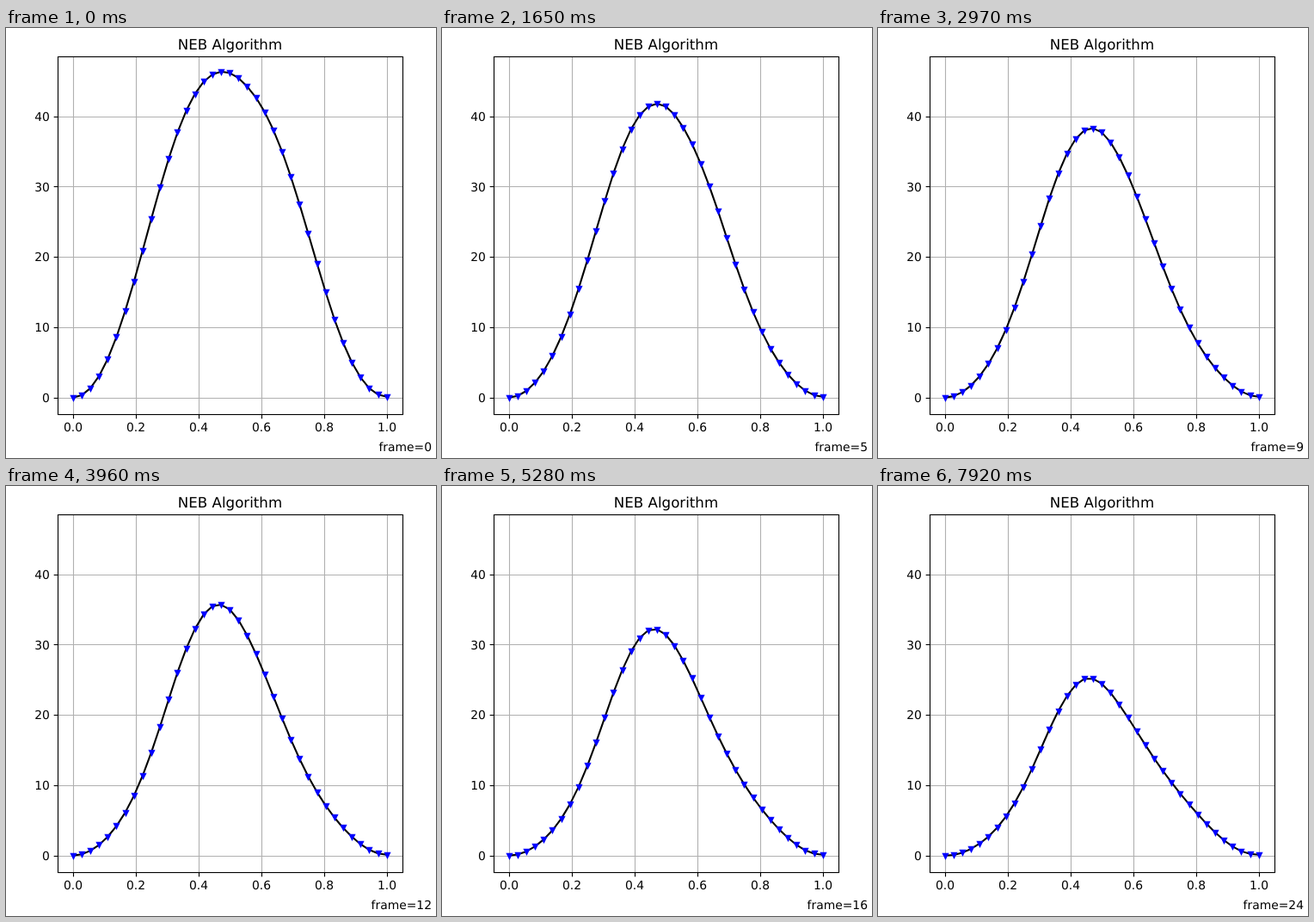
An HTML page with a canvas for the animation above (8 s loop, 500 by 500 pixels).

```html
<!DOCTYPE html>
<html lang="en">
<head>
<meta charset="utf-8">
<title>NEB Algorithm</title>
<style>
  html, body { margin: 0; width: 100%; height: 100%; overflow: hidden; background: #fff; }
  canvas { display: block; width: 500px; height: 500px; }
</style>
</head>
<body>
<canvas id="plot"></canvas>
<script>
const LOOP = 8000, STEP = 330, IMAGES = 37;
const FONT = '"DejaVu Sans", sans-serif';
const BOX = { left: 60.5, right: 461.5, top: 33.5, bottom: 449.5 };
const X0 = 77.8, WIDTH = 364.85;
const Y0 = 429.75, UNIT = 8.17;
const TICK = 4.86, THIN = 1.11;

// The barrier is sin²(πs) times a slowly varying gain in px.
// Each key gives the gain at ten evenly spaced points of the path.
const keys = [
  { iteration: 0, gain: [335, 384, 413.5, 410.6, 387, 372.4, 380.5, 376, 343, 350] },
  { iteration: 5, gain: [260, 264, 306.5, 347.6, 348.5, 323.4, 288, 240, 223.5, 257] },
  { iteration: 12, gain: [181, 187, 224.5, 283.6, 298.5, 263.4, 212, 177, 180, 195] },
  { iteration: 24, gain: [80, 119, 147.5, 195.6, 211.5, 180.4, 150, 143, 146, 115] }
];
const knots = keys[0].gain.map((_, k) => k);

// Relaxation slows down, so time is measured on a log scale
const relaxTime = n => Math.log(1 + n / 12);
const keyTimes = keys.map(key => relaxTime(key.iteration));

// Polynomial through the (at most) six knots around x
function interpolate(xs, ys, x) {
  const count = Math.min(6, xs.length);
  const before = xs.filter(v => v <= x).length;
  const start = Math.max(0, Math.min(before - count / 2, xs.length - count));
  let sum = 0;
  for (let i = start; i < start + count; i++) {
    let weight = 1;
    for (let j = start; j < start + count; j++) {
      if (j !== i) weight *= (x - xs[j]) / (xs[i] - xs[j]);
    }
    sum += weight * ys[i];
  }
  return sum;
}

function pathAt(iteration) {
  const time = relaxTime(iteration);
  const gain = knots.map(k => interpolate(keyTimes, keys.map(key => key.gain[k]), time));
  return Array.from({ length: IMAGES }, (_, i) => {
    const s = i / (IMAGES - 1);
    const height = Math.sin(Math.PI * s) ** 2 * interpolate(knots, gain, s * (knots.length - 1));
    return { x: X0 + WIDTH * s, y: Y0 - s - height };
  });
}

const canvas = document.getElementById('plot');
const ctx = canvas.getContext('2d');
const ratio = window.devicePixelRatio || 1;
canvas.width = canvas.height = Math.round(500 * ratio);
ctx.scale(ratio, ratio);
ctx.textRendering = 'geometricPrecision';

function line(x1, y1, x2, y2, color) {
  ctx.strokeStyle = color;
  ctx.lineWidth = THIN;
  ctx.beginPath();
  ctx.moveTo(x1, y1);
  ctx.lineTo(x2, y2);
  ctx.stroke();
}

function text(str, x, y, align, size = 13.89) {
  ctx.font = `${size}px ${FONT}`;
  ctx.textAlign = align;
  ctx.fillStyle = '#000';
  ctx.fillText(str, x, y);
}

function drawAxes() {
  for (let k = 0; k <= 5; k++) {
    const x = 78.5 + 73 * k;
    line(x, BOX.top, x, BOX.bottom, '#b0b0b0');
    line(x, BOX.bottom, x, BOX.bottom + TICK, '#000');
    text((k / 5).toFixed(1), x - 0.5, 469, 'center');
  }
  for (let value = 0; value <= 40; value += 10) {
    const exact = Y0 - UNIT * value;
    const y = Math.floor(exact + 0.3) + 0.5;
    line(BOX.left, y, BOX.right, y, '#b0b0b0');
    line(BOX.left - TICK, y, BOX.left, y, '#000');
    text(value, 50.9, Math.round(exact + 5), 'right');
  }
  text('NEB Algorithm', 260.5, 25, 'center', 16.67);
}

function drawMarker(x, y) {
  const r = 3;
  ctx.beginPath();
  ctx.moveTo(x, y + r);
  ctx.lineTo(x - r, y - r);
  ctx.lineTo(x + r, y - r);
  ctx.closePath();
  ctx.fill();
  ctx.stroke();
}

function drawCurve(points) {
  ctx.strokeStyle = '#000';
  ctx.lineWidth = 2.08;
  ctx.lineJoin = 'round';
  ctx.beginPath();
  for (const p of points) ctx.lineTo(p.x, p.y);
  ctx.stroke();

  // Markers sit on pixel centres
  ctx.fillStyle = ctx.strokeStyle = '#00f';
  ctx.lineWidth = 1.39;
  ctx.lineJoin = 'miter';
  for (const p of points) drawMarker(Math.round(p.x) + 0.5, Math.round(p.y) + 0.5);
}

function draw(iteration) {
  ctx.fillStyle = '#fff';
  ctx.fillRect(0, 0, 500, 500);
  drawAxes();
  drawCurve(pathAt(iteration));
  ctx.strokeStyle = '#000';
  ctx.lineWidth = THIN;
  ctx.strokeRect(BOX.left, BOX.top, BOX.right - BOX.left, BOX.bottom - BOX.top);
  text('frame=' + iteration, 495, 492, 'right');
}

const begin = performance.now();
let shown = -1;
function tick() {
  const iteration = Math.floor(((performance.now() - begin) % LOOP) / STEP);
  if (iteration !== shown) draw(shown = iteration);
  requestAnimationFrame(tick);
}
tick();
</script>
</body>
</html>
```
